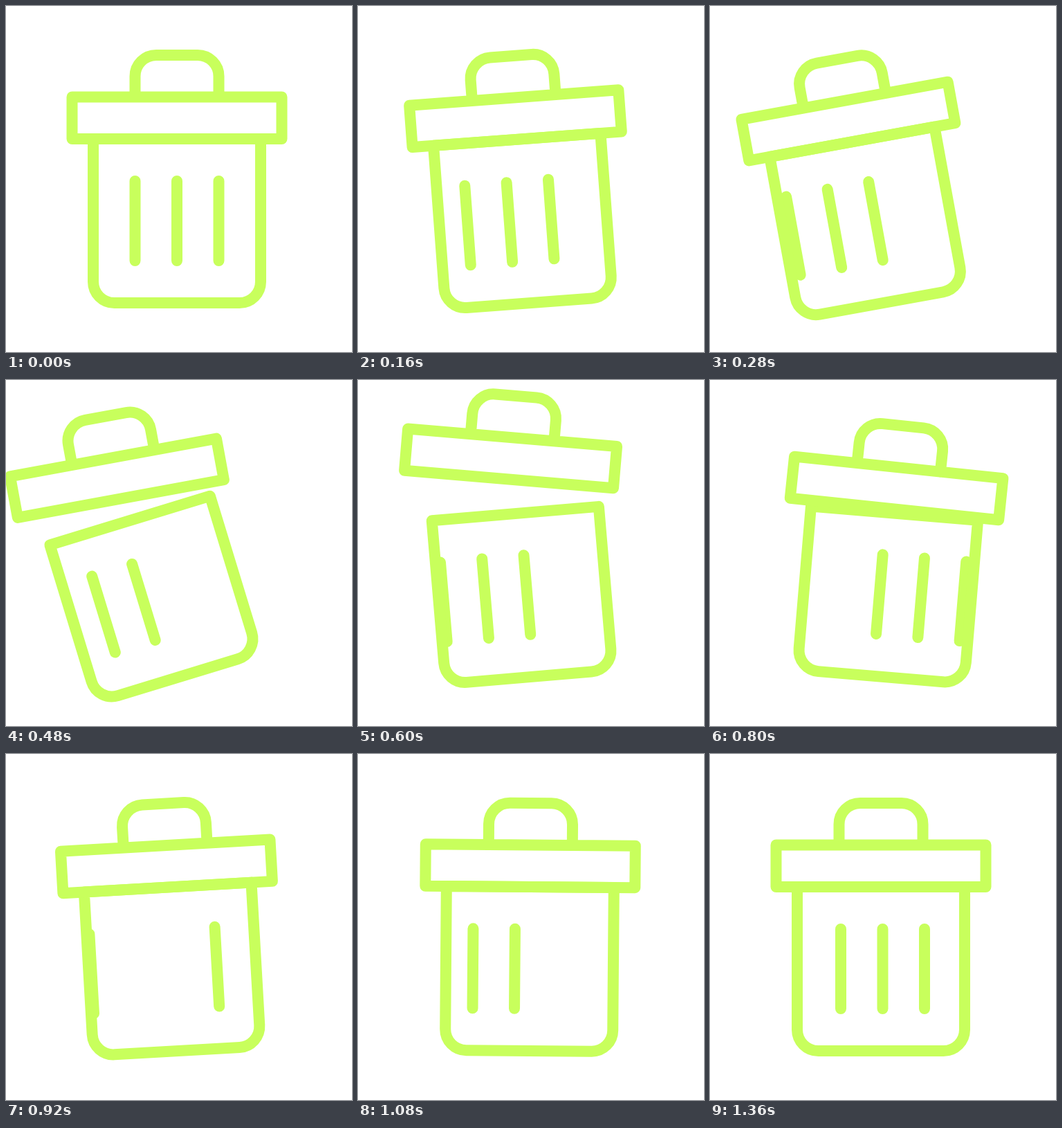
An HTML page that plays this animation: 500 by 500 pixels, repeating every 2 s.

```html
<!DOCTYPE html>
<html lang="en">
<head>
<meta charset="utf-8">
<title>Shaking bin</title>
<style>
html, body { margin: 0; height: 100%; overflow: hidden; background: #fff; }
svg { display: block; width: 100vw; height: 100vh; }
</style>
</head>
<body>
<svg viewBox="0 0 500 500" fill="none" stroke="#c8ff5c" stroke-width="16" stroke-linecap="round" stroke-linejoin="round">
  <defs>
    <clipPath id="inside"><path d="M126 192H368V429H126Z"/></clipPath>
    <path id="bars" d="M186.5 253V368M247 253V368M307.5 253V368"/>
  </defs>
  <g id="bin">
    <g clip-path="url(#inside)">
      <g id="stripes"><use href="#bars"/><use href="#bars" x="-302.5"/></g>
    </g>
    <path d="M126 192H368V398.5A30.5 30.5 0 0 1 337.5 429H156.5A30.5 30.5 0 0 1 126 398.5Z"/>
    <path id="lid" d="M95.5 131.5H398.5V192H95.5ZM186.5 131.5V101.5A30.5 30.5 0 0 1 217 71H277A30.5 30.5 0 0 1 307.5 101.5V131.5"/>
  </g>
</svg>
<script>
const LOOP = 2000, STEP = 40;
const [bin, lid, stripes] = ['bin', 'lid', 'stripes'].map(id => document.getElementById(id));

// Bezier easing from (0,0) to (1,1) with horizontal handles at x1 and x2
const ease = (x1, x2) => u => {
  let lo = 0, hi = 1, p;
  for (let i = 0; i < 24; i++) {
    p = (lo + hi) / 2;
    const q = 1 - p;
    if (3 * x1 * p * q * q + 3 * x2 * p * p * q + p ** 3 < u) lo = p; else hi = p;
  }
  return p * p * (3 - 2 * p);
};
const smooth = ease(1 / 3, 2 / 3);
const glide = ease(0.3, 0.65);

// Keys are [time, value, easing into this key]
function track(keys, t) {
  const i = keys.findIndex(key => key[0] > t);
  if (i < 0) return keys[keys.length - 1][1];
  if (i === 0) return keys[0][1];
  const [t0, v0] = keys[i - 1], [t1, v1, easing = smooth] = keys[i];
  return v0 + (v1 - v0) * easing((t - t0) / (t1 - t0));
}

const tilt = [[0, 0], [490, -17], [716, 8.3], [955, -4], [1145, 2.1], [1360, 0]];
const lift = [[320, 0], [580, 1], [860, 0]];
const slide = [[0, 0], [480, -76], [1360, 305, glide]];

function draw(now) {
  const t = Math.floor(now % LOOP / STEP) * STEP;
  const up = track(lift, t);
  bin.setAttribute('transform', `rotate(${track(tilt, t)} 250 425)`);
  lid.setAttribute('transform', `translate(0 ${-50.5 * up}) rotate(${9.8 * up} 247 162)`);
  stripes.setAttribute('transform', `translate(${track(slide, t)})`);
}

const start = performance.now();
function tick() {
  draw(performance.now() - start);
  requestAnimationFrame(tick);
}
tick();
</script>
</body>
</html>
```
